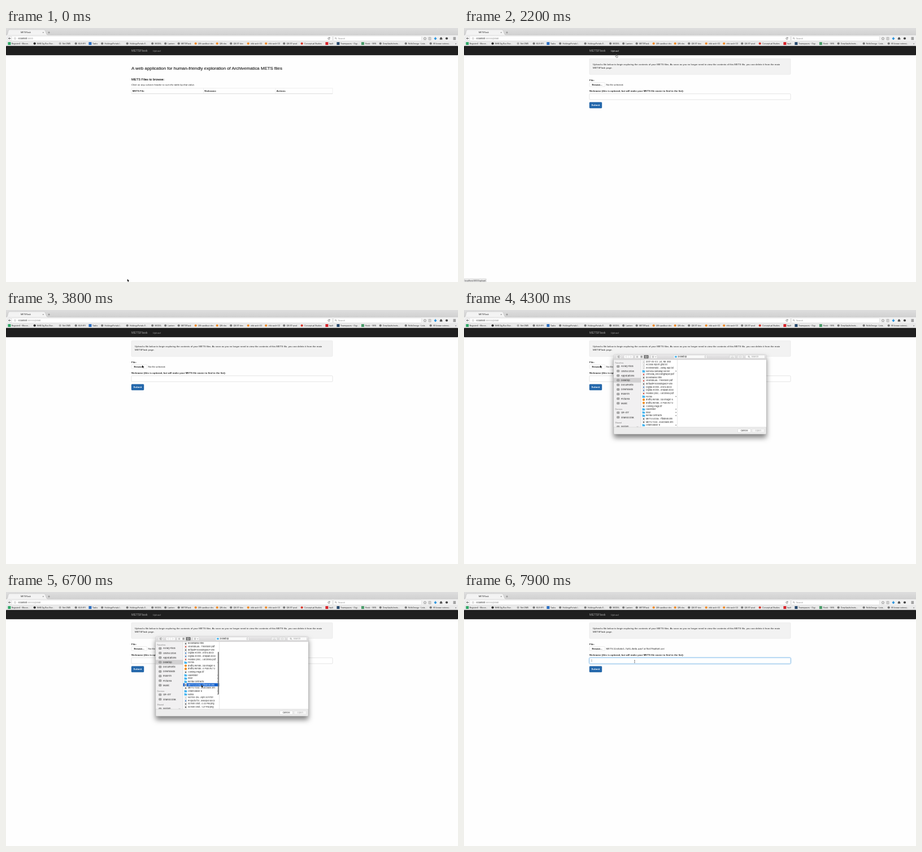
Animation of 800 by 450 pixels, one loop 8000 ms. Source, as an HTML page:

```html
<!DOCTYPE html>
<html lang="en">
<head>
<meta charset="utf-8">
<title>METSFlask</title>
<style>
  html, body { margin: 0; width: 100%; height: 100%; overflow: hidden; background: #fefefe; }
  svg { display: block; width: 800px; height: 450px; }
  text { font-family: "Liberation Sans", Arial, sans-serif; white-space: pre; }
  .ui { font-family: Inter, "Open Sans", sans-serif; }
  .b { font-weight: bold; }
  .i { font-style: italic; }
  .m { stroke: #222; stroke-width: .16px; }
  .mid { text-anchor: middle; }
  .sheet { filter: drop-shadow(0 6px 5px rgba(0, 0, 0, .5)); }
  .glow { filter: drop-shadow(0 0 1.2px #66afe9); }
</style>
</head>
<body>
<svg id="stage" viewBox="0 0 800 450"></svg>
<script>
const INK = '#222', GREY = '#777', BLUE = '#2468ac';

const text = (x, y, s, size = 4.375, fill = INK, cls = '') =>
  `<text x="${x}" y="${y}" font-size="${size}" fill="${fill}" class="${cls}">${s}</text>`;
const rect = (x, y, w, h, fill, stroke = 'none', r = 0, extra = '') =>
  `<rect x="${x}" y="${y}" width="${w}" height="${h}" rx="${r}" fill="${fill}" stroke="${stroke}" stroke-width=".4" ${extra}/>`;
const dot = (x, y, r, fill) => `<circle cx="${x}" cy="${y}" r="${r}" fill="${fill}"/>`;
const path = (d, stroke = '#555', width = .6, fill = 'none', extra = '') =>
  `<path d="${d}" stroke="${stroke}" stroke-width="${width}" fill="${fill}" ${extra}/>`;
const group = (id, body, extra = '') => `<g id="${id}" ${extra}>${body}</g>`;
const lens = (x, y, c = GREY) => path(`M${x + .7} ${y + .7}l1.4 1.4`, c, .6) +
  `<circle cx="${x}" cy="${y}" r="1.1" fill="none" stroke="${c}" stroke-width=".5"/>`;

// text x, label, icon colour, square icon
const bookmarks = [
  [10, 'Register4 - Morve...', '#2fa866', 1], [55, 'NHB Dig Box Stor...', '#222'],
  [100, 'Net DMS', '#aaa'], [128, 'KLR API', '#777'], [153, 'Tasks', '#2b6fc2', 1],
  [174.5, 'HoldingsPortals I...', '#777'], [219, 'HoldingsPortals E...', '#777'],
  [263.5, 'MODEL', '#777'], [286.5, 'Lantern', '#777'], [310, 'METSFlask', '#777'],
  [340, 'QN-sandbox-dev', '#f08a24'], [378, 'QN-dev', '#f08a24'], [402.5, 'QN ST-dev', '#777'],
  [433, 'nhb-arch-02', '#f08a24'], [464.5, 'nhb-arch-03', '#f08a24'], [496.5, 'QN ST-prod', '#777'],
  [528, 'Conceptual Studies', '#d9372c'], [572, 'fault', '#d8232a', 1],
  [592, 'Teamspaces - Digi...', '#27496d', 1], [635.5, 'Stock - VKN', '#4a9c6a', 1],
  [667, 'DeepVaults/mets...', '#777'], [712, 'RollsOmega - Lists...', '#777'],
  [756, 'All known extensi...', '#777']
];

function chrome() {
  const marks = bookmarks.map(([x, label, c, square]) =>
    (square ? rect(x - 6.6, 25, 5, 5, c, 'none', .6) : dot(x - 4.3, 27.5, 2.1, c)) +
    text(x, 28.7, label, 3.35, '#222', 'ui')).join('');
  return rect(0, 0, 800, 13, 'url(#strip)') + rect(0, 12.5, 800, 11, '#f1f1f1') +
    rect(0, 23, 800, 9, '#e9e9e9') +
    path('M0 12.6H1C4 12 3 3 6 3H67C71 3 70 12 74 12.6H800', '#b5b5b5', .4, '#f3f3f3') +
    text(26, 9.3, 'METSFlask', 3.4, '#222', 'ui') +
    path('M64.8 7l2 2m0 -2l-2 2', '#666', .5) + path('M74.3 8h3.4m-1.7 -1.7v3.4', '#666', .6) +
    rect(9, 14.2, 568.5, 8.6, '#fff', '#c4c4c4', 1) + rect(579.5, 14.2, 156, 8.6, '#fff', '#c4c4c4', 1) +
    `<circle cx="6.5" cy="18.4" r="4.2" fill="#fafafa" stroke="#bbb" stroke-width=".4"/>` +
    path('M8.8 18.4H4.6m1.8 -1.9l-1.9 1.9l1.9 1.9', '#444', .8) +
    `<circle cx="16" cy="18.5" r="1.6" fill="none" stroke="#888" stroke-width=".4"/>` +
    path('M16 17.6v.4m0 .4v1.2', '#888', .4) +
    `<text x="21.5" y="19.9" font-size="3.75" class="ui" fill="#222">localhost<tspan fill="#888">:5000<tspan id="route"></tspan></tspan></text>` +
    path('M572.9 17.5a1.7 1.7 0 1 0 .3 1.6m0 -2.8v1.7h-1.7', '#444', .6) +
    lens(583.5, 18) + text(588, 19.9, 'Search', 3.6, '#888', 'ui') +
    path('M741.5 16.1l.8 1.7 1.8.2-1.3 1.3.3 1.9-1.6-.9-1.6.9.3-1.9-1.3-1.3 1.8-.2z', '#555', .5) +
    rect(748, 16.5, 4, 4.6, 'none', '#555', .4) + path('M749 18h2m-2 1.5h2', '#555', .4) +
    path('M760 16v3m-2 -1l2 2.3l2 -2.3', '#168bdc', 1.3) +
    path('M767.3 18.7l2.7-2.6 2.7 2.6h-.8v2.4h-1.3v-1.6h-1.2v1.6h-1.3v-2.4z', 'none', 0, '#444') +
    dot(780, 18.5, 2.1, '#444') +
    path('M791.5 16.8h4.6m-4.6 1.8h4.6m-4.6 1.8h4.6', '#444', .8) +
    marks + text(795, 28.7, '»', 4, '#444', 'ui') +
    rect(0, 32, 800, 16, '#1f1f1f', '#0a0a0a', 1) +
    text(222, 42.1, 'METSFlask', 5.5, '#a5a5a5') +
    `<text id="link" x="259.8" y="41.8" font-size="4.375">Upload</text>`;
}

function homePage() {
  const edges = [222, 349.5, 477, 578].map(x => `M${x} 106.7V116.5`).join('');
  return text(222, 73.7, 'A web application for human-friendly exploration of Archivematica METS files', 7.85, INK, 'm') +
    text(222, 92.7, 'METS Files to browse:', 5.78, INK, 'm') +
    text(222, 101.8, 'Click on any column header to sort the table by that value.', 4.375, INK, 'i') +
    path(edges + 'M222 106.7H578', '#d8d8d8', .4) + path('M222 116.4H578', '#d0d0d0', .7) +
    text(223.8, 113.2, 'METS File', 4.375, INK, 'b') + text(351.3, 113.2, 'Nickname', 4.375, INK, 'b') +
    text(478.8, 113.2, 'Actions', 4.375, INK, 'b');
}

function uploadPage() {
  return rect(222, 54.5, 356, 27.8, '#f2f2f2', '#dcdcdc', 1.2) +
    text(228, 65.6, 'Upload a file below to begin exploring the contents of your METS files. As soon as you no longer need to view the contents of this METS file, you can delete it from the main') +
    text(228, 71.9, 'METSFlask page.') +
    text(222, 93.7, 'File:', 4.375, INK, 'b') +
    rect(222.2, 96.7, 27.4, 7.2, '#fff', '#d0d0d0', 1.3) + text(226.6, 101.6, 'Browse...', 4.375, INK, 'm') +
    `<text id="chosen" x="251.5" y="101.6" font-size="4.375" fill="${INK}"></text>` +
    text(222, 113.2, 'Nickname (this is optional, but will make your METS file easier to find in the list):', 4.375, INK, 'b') +
    rect(222, 116.6, 356, 10.3, '#fff', '#bbb', 1.2) +
    group('focus', rect(222, 116.6, 356, 10.3, '#fff', '#4fa3e6', 1.2, 'class="glow"') +
      path('M226 119.2v4.8', '#333', .4)) +
    rect(222, 131.6, 22, 10.4, BLUE, '#1f5c9a', 1.2) + text(233, 138.4, 'Submit', 4.375, '#fff', 'mid b');
}

const STEP = 5.63, PICK = 18;
// kind: d folder, p pdf, a application, t document, x dark document
const files = [
  't2017-05-03...LK, RB .xlsx', 'tAccess report grid.txt', 'tArchivematic...cking App.txt',
  'dNorvela Gateway Server', 'pOrmelda_EncodingPaper.pdf', 'xbookmarks.html',
  'pVelandoLas...TheVision.pdf', 'xdefaultProcessingMCP.xml', 'wDigital Archiv...61014.docx',
  'wDigital Archiv...orkplan.docx', 'pFlexible proc...l archives.pdf', 'dForms',
  'adraftQ Rende...ius Imager 6.', 'adraftQ Rende...e Plus v6.7.3', 'xComing-Page.tif',
  'dHalvender', 'dmilor', 'dRental contracts', 'xMETS.52c0a...7fbd8e8.xml',
  'xMETS.7232...454cba0e.xml', 'dGridmodeler K', 'dNotes', 'tNOTES ON...April 2017.txt',
  'wProjects for...eveloper.docx', 'xScreen Shot...0.33 PM.png', 'xScreen Shot...1.27 PM.png'
];

function fileIcon(kind, y) {
  if (kind === 'd') return path(`M315.6 ${y - 1.9}h1.9l.5.6h2.3v3.4h-4.7z`, 'none', 0, '#43b3ee');
  if (kind === 'a') return dot(318, y, 2.1, '#f08c1e');
  const mark = { p: '#d63a2f', x: '#555', w: '#3a78c4', t: '#ccc' }[kind];
  return rect(316.2, y - 2.4, 3.6, 4.8, '#fff', '#bbb') + rect(316.9, y - .7, 2.2, 1.9, mark);
}

function fileRow(name, i) {
  const y = 91.4 + i * STEP, kind = name[0];
  const arrow = kind === 'd' ? path(`M374.6 ${y - 1}l1.7 1l-1.7 1z`, 'none', 0, '#555') : '';
  const bar = i === PICK ? rect(313.4, y - 2.8, 64, STEP, '#1261cf', 'none', 0, 'id="bar"') : '';
  return bar + fileIcon(kind, y) + arrow +
    `<text id="row${i}" x="322" y="${y + 1.3}" font-size="3.7" fill="${INK}" class="ui">${name.slice(1)}</text>`;
}

function sidebar() {
  const items = [[100, 'All My Files'], [108.1, 'Online Drive'], [116.3, 'Applications'], [124.4, 'Desktop'],
    [132.6, 'Documents'], [140.8, 'Downloads'], [148.9, 'mdorrin'], [157.1, 'Pictures'], [165.2, 'Music'],
    [181.9, 'QR-417'], [190.1, 'Shared Disk'], [207, 'system']];
  const heads = [[94.5, 'Favorites'], [176.6, 'Devices'], [201.3, 'Shared']];
  return rect(265, 88, 48.3, 119.6, '#f1f0f1') + rect(265, 120.3, 48.3, 8.2, '#d2d1d2') +
    heads.map(([y, s]) => text(267.6, y, s, 3.4, GREY, 'ui')).join('') +
    items.map(([y, s]) => rect(270.6, y - 1.7, 4.4, 3.4, '#aaa', '#666', .7) +
      text(278, y + 1.4, s, 4, '#222', 'ui')).join('') +
    path('M306 206.4l1 1l1 -1', '#555', .5);
}

function dialog() {
  const button = (x, w, fill = '#fafafa') => rect(x, 79.9, w, 5.9, fill, '#c0c0c0', .9);
  return rect(265, 79, 270, 141, '#ececec', '#aaa', 1.5, 'class="sheet"') +
    rect(265, 79, 270, 9, 'url(#bar-fill)', 'none', 1.5) +
    button(269.5, 9) + rect(272, 81.4, 4, 2.8, 'none', '#444') + path('M273.5 81.4v2.8', '#444', .5) +
    button(283, 16.5) + path('M291.2 80v5.8', '#ccc', .3) +
    path('M287.8 81.4l-1.4 1.4l1.4 1.4M294.6 81.4l1.4 1.4l-1.4 1.4', '#aaa', .5) +
    button(302.5, 24) + rect(318.4, 79.9, 8.1, 5.9, '#646464', 'none', .8) +
    path('M305 82h1.2m.6 0h1.2m-3 1.8h1.2m.6 0h1.2M312.4 81.7h3.6m-3.6 1.2h3.6m-3.6 1.2h3.6', '#555', .7) +
    rect(320.4, 81.4, 4.2, 2.9, 'none', '#fff') + path('M321.8 81.4v2.9m1.4 -2.9v2.9', '#fff', .4) +
    button(330.5, 11.5) + path('M333 82h1.2m.6 0h1.2m-3 1.8h1.2m.6 0h1.2M338.2 82.4l1 1l1 -1', '#555', .7) +
    button(371, 59) + rect(373, 81.4, 3.8, 2.9, '#43b3ee', 'none', .4) +
    text(378.5, 84.2, 'Desktop', 4, '#222', 'ui') + path('M426 82.3l1 -1l1 1m-2 1.2l1 1l1 -1', '#444', .5) +
    button(469.5, 11, '#eee') + path('M473 83.2v1.4h4v-1.4M475 84v-3', '#bbb', .5) +
    button(483.5, 11, '#eee') + rect(487, 81.8, 4, 2.4, 'none', '#bbb', 1.2) +
    button(498, 34.5) + lens(504, 82.5) + text(508.5, 84.2, 'Search', 3.9, '#999', 'ui') +
    rect(313.3, 88, 221.7, 119.6, '#fff') +
    `<g clip-path="url(#list)">${sidebar()}${group('rows', files.map(fileRow).join(''))}` +
    rect(374.9, 88.5, 1.8, 75, '#757575', 'none', .9, 'id="thumb"') + '</g>' +
    path('M265 88H535M265 207.6H535M313.3 88V207.6M377.5 88V207.6', '#c6c6c6', .4) +
    rect(484.5, 210.6, 23, 6.3, '#fff', '#c0c0c0', 1) + text(496, 215.2, 'Cancel', 4, '#222', 'ui mid') +
    rect(509.7, 210.6, 22, 6.3, '#f5f5f5', '#d0d0d0', 1) + text(520.7, 215.2, 'Open', 4, '#aaa', 'ui mid');
}

const stage = document.getElementById('stage');
stage.innerHTML = `<defs>
  <linearGradient id="strip" x2="0" y2="1"><stop stop-color="#dedede"/><stop offset="1" stop-color="#d0d0d0"/></linearGradient>
  <linearGradient id="bar-fill" x2="0" y2="1"><stop stop-color="#e9e8e9"/><stop offset="1" stop-color="#d5d4d5"/></linearGradient>
  <clipPath id="list"><rect x="265" y="88.2" width="270" height="119.3"/></clipPath></defs>` +
  rect(0, 0, 800, 450, '#fefefe') + chrome() + group('home', homePage()) + group('upload', uploadPage()) +
  group('status', rect(-1, 444.2, 40.5, 7, '#e8e8e8', '#bbb', .8) +
    text(1, 448.7, 'localhost:5000/upload', 3.5, '#333', 'ui')) +
  group('dialog', dialog()) +
  group('arrow', path('M0 0v4.3l1-.9.7 1.7.8-.4-.7-1.6h1.4z', '#fff', .7, '#000', 'paint-order="stroke"')) +
  group('hand', path('M-.4 0q.5-.5.9 0v1.8l1.6.4q.5.2.4.8l-.4 2.2h-2.4l-1.6-2.1q.2-.7 1.5 0z', '#222', .5, '#fff')) +
  group('beam', path('M-.8 -2.2q.8 0 .8.6v3.4q0 .6-.8.6M.8 -2.2q-.8 0-.8.6m0 3.4q0 .6.8.6', '#222', .5));

const $ = id => document.getElementById(id);
const show = (id, on) => $(id).setAttribute('display', on ? 'inline' : 'none');
const move = (id, x, y) => $(id).setAttribute('transform', `translate(${x} ${y})`);

// Eased interpolation over [time, value, value...] keys.
function along(keys, t) {
  const n = keys.findIndex(k => k[0] > t);
  if (n < 0) return keys.at(-1).slice(1);
  const [a, b] = [keys[n - 1], keys[n]], u = (t - a[0]) / (b[0] - a[0]), e = u * u * (3 - 2 * u);
  return a.slice(1).map((v, i) => v + (b[i + 1] - v) * e);
}

const pointer = [[0, 214.8, 444.8], [100, 214.8, 444.8], [900, 263, 88], [1300, 269.8, 47], [2300, 269.8, 47],
  [3000, 246.2, 91.6], [3500, 241, 98], [4500, 241, 98], [5100, 339, 154.8], [5700, 339, 154.8],
  [6400, 345.8, 164.5], [6900, 345.8, 164.5], [7300, 306, 126], [7600, 302, 123], [8000, 302, 123]];
const scroll = [[0, 0], [4900, 0], [5400, 26], [5600, 26], [6000, 28.4], [8000, 28.4]];

function draw(now) {
  const t = Math.floor(now % 8000 / 100) * 100;
  const [x, y] = along(pointer, t), [top] = along(scroll, t);
  const uploading = t >= 2200, hover = t >= 1200 && t < 2500, picked = t >= 6600, closed = t >= 6900;
  const beam = t >= 7200;
  show('home', !uploading);
  show('upload', uploading);
  show('status', t >= 1900 && t < 3200);
  show('dialog', t >= 4000 && !closed);
  show('focus', t >= 7700);
  show('bar', picked);
  show('thumb', top > 0);
  show('hand', hover);
  show('beam', beam);
  show('arrow', !hover && !beam);
  for (const id of ['arrow', 'hand', 'beam']) move(id, x, y);
  move('rows', 0, -top);
  move('thumb', 0, top * .62);
  $('row' + PICK).setAttribute('fill', picked ? '#fff' : INK);
  $('link').setAttribute('fill', hover ? '#eee' : '#9d9d9d');
  $('route').textContent = uploading ? '/upload' : '';
  $('chosen').textContent = closed ? 'METS.52c0a6e1-7a81-4b6b-aab7-b78c07fbd8e8.xml' : 'No file selected.';
}

const start = performance.now();
function tick() {
  draw(performance.now() - start);
  requestAnimationFrame(tick);
}
tick();
</script>
</body>
</html>
```
